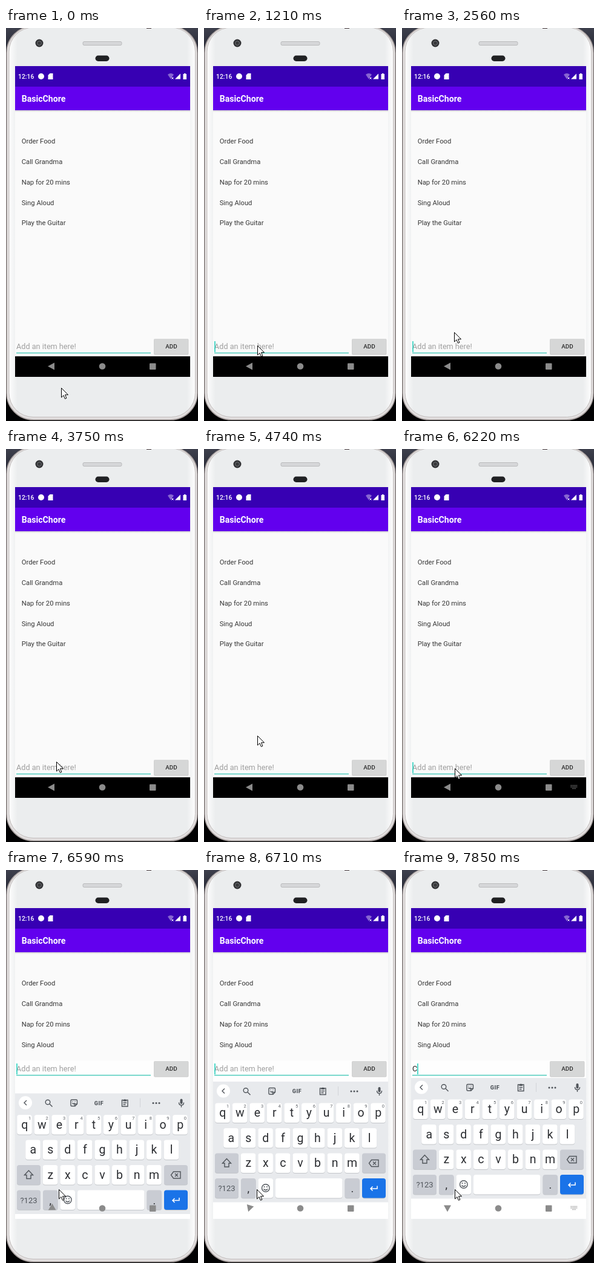
Write an HTML page that moves like this. It is 317 by 650 pixels and loops after 8000 ms.

```html
<!DOCTYPE html>
<html lang="en">
<head>
<meta charset="utf-8">
<title>Todo list</title>
<style>
  html, body { margin: 0; width: 100%; height: 100%; overflow: hidden; background: #000; }
  svg { display: block; width: 100vw; height: 100vh; font-family: Roboto, sans-serif; }
  .line { fill: none; stroke: #50555b; stroke-width: 1.4; }
  .mid { text-anchor: middle; }
</style>
</head>
<body>
<svg viewBox="0 0 317 650">
  <defs>
    <linearGradient id="wall" x1="0" y1="0" x2="0" y2="1">
      <stop offset="0" stop-color="#3e404d"/><stop offset=".05" stop-color="#2a2c38"/>
      <stop offset=".1" stop-color="#090a10"/><stop offset="1" stop-color="#020203"/>
    </linearGradient>
    <linearGradient id="shell">
      <stop offset="0" stop-color="#fdfdfd"/><stop offset=".045" stop-color="#ebedee"/>
      <stop offset=".955" stop-color="#ebedee"/><stop offset="1" stop-color="#fdfdfd"/>
    </linearGradient>
    <linearGradient id="shade" x1="0" y1="0" x2="0" y2="1">
      <stop offset="0" stop-color="#ccc"/><stop offset="1" stop-color="#fafafa"/>
    </linearGradient>
    <clipPath id="screen"><path d="M15 63H304V577H15Z"/></clipPath>
  </defs>

  <!-- Phone body -->
  <path d="M0 0H317V650H0Z" fill="url(#wall)"/>
  <rect x="1" y="-3" width="315" height="651" rx="44" fill="#e3e0e0" stroke="#aaa2a1" stroke-width="1.500"/>
  <rect x="5" y="-1" width="307.500" height="644.500" rx="40" fill="url(#shell)" stroke="#c2bdbc"/>
  <path d="M232 .5h8" stroke="#44373a"/>
  <circle cx="55" cy="25" r="6.500" fill="#303133"/>
  <circle cx="55" cy="25" r="3.500" fill="#38393b" stroke="#707377"/>
  <rect x="127" y="22.500" width="64" height="6" rx="2" fill="#d6d7d9" stroke="#b0b1b3" stroke-width=".8"/>
  <rect x="147.500" y="45.500" width="23" height="9.500" rx="4.700" fill="#202123"/>

  <g clip-path="url(#screen)">
    <path d="M15 63H304V577H15Z" fill="#fafafa"/>
    <path d="M15 136H304V139H15Z" fill="url(#shade)"/>
    <path d="M15 63H304V97H15Z" fill="#3700b3"/>
    <path d="M15 97H304V136H15Z" fill="#6200ee"/>
    <g fill="#fff" font-weight="500">
      <text x="20" y="83.700" font-size="10.400">12:16</text>
      <text x="25.700" y="122" font-size="14.100" font-weight="700">BasicChore</text>
      <circle cx="58" cy="80" r="5"/>
      <path d="M72.500 75H77.500V85H69.500V78Z"/>
      <path d="M267 77Q272 73 277 77L272 84.500Z" opacity=".4"/>
      <path d="M273.500 81.500l3 3m0-3l-3 3" stroke="#fff"/>
      <path d="M279 84.500H288V75.500Z"/>
      <path d="M294 75h2.500v1H298v9h-5.500v-9H294Z"/>
    </g>
    <g id="list" font-size="11.250" fill="#363636"></g>

    <g id="entry">
      <path id="entryBack" d="M15 513H304V577H15Z"/>
      <path d="M17 537.500H239" stroke="#4bcabb" stroke-width="1.500"/>
      <text id="entryText" x="17" y="531" font-size="12.660"></text>
      <path id="caret" d="M18 518V536" stroke="#18cdb9" stroke-width="1.500"/>
      <rect x="244" y="514" width="57.500" height="26.500" rx="2" fill="#d0d0d0"/>
      <rect x="245" y="514" width="55.500" height="25" rx="1.500" fill="#d6d7d7"/>
      <text class="mid" x="273" y="530" font-size="9.850" font-weight="500" fill="#2a2a2a">ADD</text>
    </g>

    <path id="navBar" d="M15 543H304V577H15Z"/>
    <g id="keyboard" fill="#2b2d31"><path d="M15 344H304V543.500H15Z" fill="#e8eaed"/></g>
    <g fill="#8b8b8b">
      <path id="back" d="M-6 0L5 -6V6Z"/>
      <circle cx="159" cy="559.500" r="5.300"/>
      <rect x="237" y="554.500" width="10.500" height="10.500" rx="1"/>
      <path id="imeIcon" d="M278.500 556.500h11m-11 2.500h11m-8.500 2.500h6" fill="none" stroke="#8b8b8b" stroke-width="1.500" stroke-dasharray="1.500 .8" opacity=".8"/>
    </g>
  </g>

  <path id="pointer" d="M.5 .5V16L4 12.600L6.400 18.300L8.900 17.200L6.500 11.700H11.500Z" fill="#fff" stroke="#000" stroke-linejoin="round"/>
</svg>

<script>
const LOOP = 8000;
const $ = id => document.getElementById(id);

// [time, x, y]: each position holds until the next
const pointerPath = [
  [0, 91, 595], [290, 106, 592], [410, 124, 585], [560, 142, 563], [690, 124, 541],
  [810, 102, 530], [960, 88, 525], [1480, 88, 515], [1610, 88, 500], [1730, 88, 495],
  [2560, 86, 503], [2680, 84, 512], [2800, 83, 517], [4180, 86, 490], [4310, 88, 474],
  [4860, 88, 475], [5000, 88, 480], [5130, 88, 485], [5280, 89, 492], [5430, 89, 499],
  [5580, 89, 512], [5700, 89, 526], [5820, 89, 534], [5960, 88, 530], [6090, 87, 528]
];
const caretToggles = [290, 690, 1210, 1730, 2290, 2680, 3200, 3750, 4180, 4740, 5280, 5820, 6090, 7110, 7700];
// [time, keyboard offset, back arrow turn]
const keyboardSteps = [[0, 300, 0], [6590, 25.5, -30], [6710, 6, -72], [6830, 0, -90]];
const IME_ICON = 6220, KEYBOARD = 6590, SETTLED = 6830, TYPED = 7850;

const text = (x, y, size, value, extra = '') =>
  `<text class="mid" x="${x}" y="${y}" font-size="${size}" ${extra}>${value}</text>`;

const key = (x, y, width, fill = '#fff') =>
  `<rect x="${x}" y="${y + 1}" width="${width}" height="32.5" rx="4" fill="#c3c6ca"/>` +
  `<rect x="${x}" y="${y}" width="${width}" height="32.5" rx="4" fill="${fill}"/>`;

function letterRow(letters, left, top, numbered) {
  return [...letters].map((letter, i) => {
    const x = left + i * 28.55;
    return key(x, top, 24.6) + text(x + 12.5, top + 22.5, 19.5, letter) +
      (numbered ? text(x + 20.8, top + 7.5, 7.5, (i + 1) % 10, 'fill="#5f6368"') : '');
  }).join('');
}

function buildKeyboard() {
  const gray = '#c9ccd3';
  const toolbar = `
    <circle cx="32" cy="359.500" r="11" fill="#fff"/>
    <g class="line">
      <path d="M34 355.500l-4 4l4 4"/>
      <circle cx="69" cy="358.500" r="3.800"/><path d="M72 361.500l4.500 4.500"/>
      <path d="M108.500 354.500h7.500q1.500 0 1.500 1.500v5.500l-3.500 3.500h-5.500q-1.500 0-1.500-1.500v-7.500q0-1.500 1.500-1.500M117 361.500h-3.500v3.500M109.500 360q2 2.500 4 0M109.500 357.500h1m3 0h1"/>
      <path d="M191.500 355h9.500v10.500h-9.500zM193.500 359.500h5.500m-5.500 3h4"/>
    </g>
    <path d="M193.500 354.500h1.500q1.300-2 2.600 0h1.400v2.500h-5.500z" fill="#50555b"/>
    <path class="line" d="M285.500 359q0 4.500 4 4.500t4-4.500M289.500 363.500v3.500"/>
    <path d="M221.500 352v15" stroke="#d2d4d8"/>
    <rect x="287.500" y="353" width="4" height="8.500" rx="2" fill="#50555b"/>
    ${[243, 248, 253].map(x => `<circle cx="${x}" cy="360" r="1.500" fill="#50555b"/>`).join('')}
    ${text(153.5, 363.2, 9, 'GIF', 'font-weight="900" fill="#50555b" letter-spacing=".6"')}`;
  const special = key(18, 462.5, 39, gray) + key(261, 462.5, 39, gray) +
    key(18, 504, 39, gray) + key(61, 504, 24.6, gray) + key(89.5, 504, 24.6) +
    key(118, 504, 110.5) + key(232.5, 504, 24.6, gray) + key(261, 504, 39, '#1a73e8') +
    text(37.5, 525, 13, '?123', 'fill="#50555b"') + text(73.3, 527, 18, ',') + text(244.8, 527, 18, '.') + `
    <g class="line">
      <path d="M37.500 471.500l-7 7.500h3.500v6h7v-6h3.500z"/>
      <path d="M276.500 473.500h11.500v11h-11.500l-4-5.500zM279 476.500l5 5m0-5l-5 5"/>
      <circle cx="101.800" cy="520" r="6.300"/><path d="M98.500 521.500q3.300 4 6.600 0"/>
    </g>
    <path d="M99.500 517v2m4.500-2v2" stroke="#50555b" stroke-width="1.500"/>
    <path d="M286 516.500v4.500h-11m3.500-3.500l-3.500 3.500l3.500 3.500" fill="none" stroke="#fff" stroke-width="1.500"/>`;
  return toolbar + letterRow('qwertyuiop', 18.2, 379.5, true) +
    letterRow('asdfghjkl', 32.2, 421, false) + letterRow('zxcvbnm', 60.8, 462.5, false) + special;
}

const items = ['Order Food', 'Call Grandma', 'Nap for 20 mins', 'Sing Aloud', 'Play the Guitar'];
$('list').innerHTML = items.map((item, i) =>
  `<text x="25.7" y="${Math.round(191.2 + i * 33.8)}">${item}</text>`).join('');
$('keyboard').innerHTML += buildKeyboard();

const stepAt = (steps, t) => steps.findLast(step => step[0] <= t);
const show = (id, visible) => $(id).setAttribute('visibility', visible ? 'visible' : 'hidden');
const move = (id, x, y, turn = 0) => $(id).setAttribute('transform', `translate(${x} ${y}) rotate(${turn})`);
const fill = (id, color) => $(id).setAttribute('fill', color);

function draw(t) {
  const [, px, py] = stepAt(pointerPath, t);
  const [, offset, turn] = stepAt(keyboardSteps, t);
  const open = t >= KEYBOARD, typed = t >= TYPED;

  move('pointer', px, py);
  move('entry', 0, open ? -198 : 0);
  move('keyboard', 0, offset);
  move('back', 75, 559.5, turn);
  move('caret', typed ? 8 : 0, 0);

  show('caret', caretToggles.filter(time => time <= t).length % 2);
  show('keyboard', open);
  show('imeIcon', t >= IME_ICON && (!open || t >= SETTLED));

  $('entryText').textContent = typed ? 'C' : 'Add an item here!';
  fill('entryText', typed ? '#222' : '#9f9f9f');
  fill('entryBack', open ? '#fefefe' : '#fafafa');
  fill('navBar', open ? '#fff' : '#000');
}

const start = performance.now();
function tick() {
  draw((performance.now() - start) % LOOP);
  requestAnimationFrame(tick);
}
tick();
</script>
</body>
</html>
```
